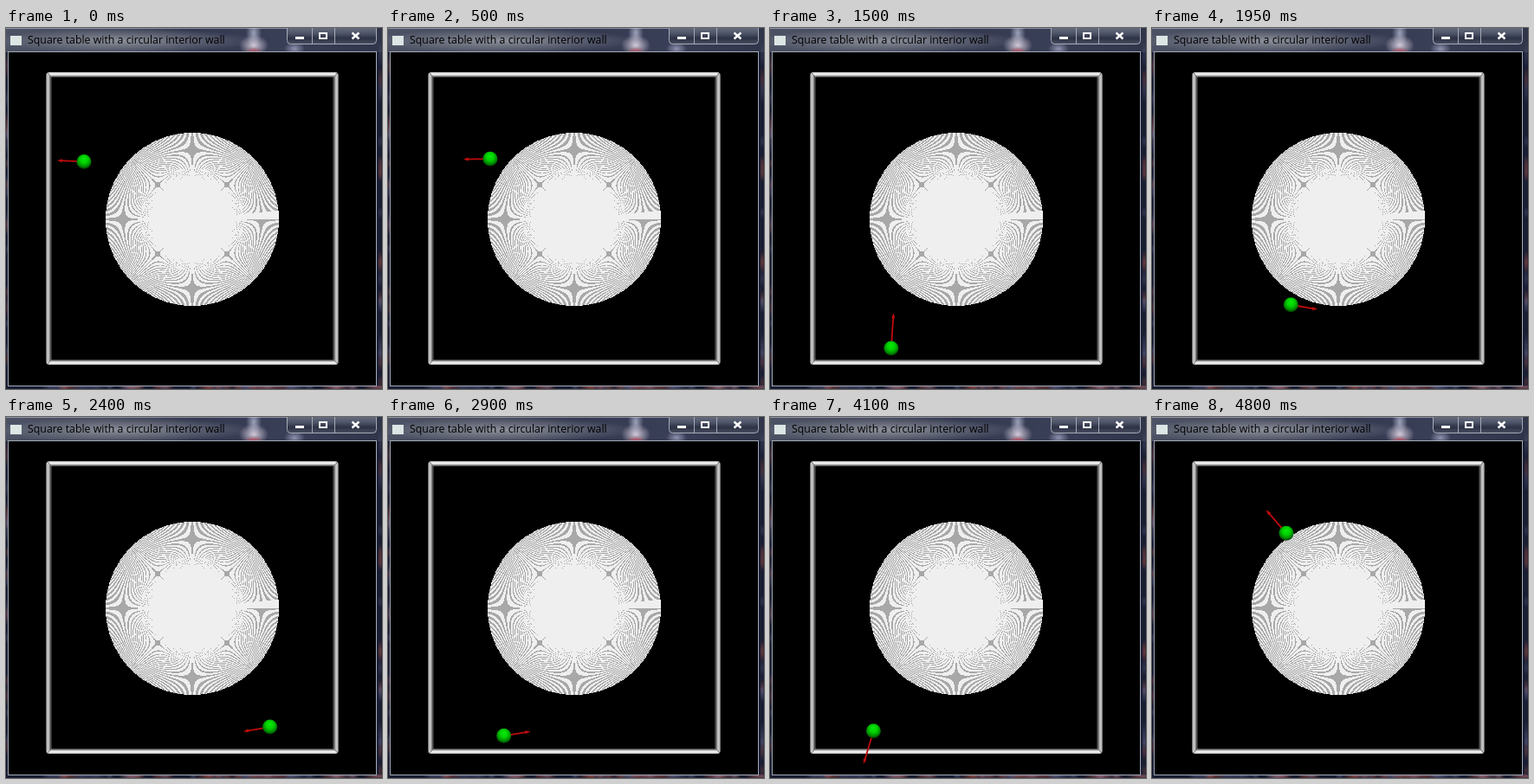
Recreate the animation shown at these times as an HTML page with a canvas. Size 434 by 417 pixels, loop 4850 ms.

```html
<!DOCTYPE html>
<html lang="en">
<head>
<meta charset="utf-8">
<title>Circular wall table</title>
<style>
  html, body { margin: 0; width: 100%; height: 100%; overflow: hidden; background: #000; }
  canvas { display: block; }
</style>
</head>
<body>
<canvas id="stage" width="434" height="417"></canvas>
<script>
const W = 434, H = 417, STEP = 50, STEPS = 97;
const CX = 215, CY = 220, R = 100;
const LEFT = 53, RIGHT = 382, TOP = 56, BOTTOM = 384.5;
const SPEED = 33.5;
const ctx = document.getElementById('stage').getContext('2d');

// Each launch: step, position, heading in degrees. Wall bounces follow by folding.
const launches = [
  [0, 90, 154.4, 182],
  [3.7, 143.3, 150.7, 270],
  [9.25, 143, 150.9, 179.3],
  [14.33, 141, 152.7, 266.7],
  [20.6, 129, 169, 145.6],
  [26.15, 128.4, 270.5, 84.9],
  [32.3, 147.5, 293.5, 172.4],
  [35.77, 53, 306, 7.3],
  [70.2, 233.6, 318.3, 150.2],
  [79.77, 146.9, 293.2, 111.6],
  [95.88, 158, 137, 221.3]
];

// Reflects a straight coordinate between two walls.
function fold(v, lo, hi) {
  const span = hi - lo;
  const u = (((v - lo) % (2 * span)) + 2 * span) % (2 * span);
  return u < span ? { pos: lo + u, sign: 1 } : { pos: hi - (u - span), sign: -1 };
}

function ballAt(step) {
  const [t0, x0, y0, deg] = launches.findLast(l => l[0] <= step);
  const a = deg * Math.PI / 180, s = SPEED * (step - t0);
  const fx = fold(x0 + s * Math.cos(a), LEFT, RIGHT);
  const fy = fold(y0 + s * Math.sin(a), TOP, BOTTOM);
  return { x: fx.pos, y: fy.pos, ux: Math.cos(a) * fx.sign, uy: Math.sin(a) * fy.sign };
}

let seed = 7;
function random() {
  seed = (seed * 16807) % 2147483647;
  return seed / 2147483647;
}

function gradient(g, x0, y0, x1, y1, colors) {
  const grad = g.createLinearGradient(x0, y0, x1, y1);
  colors.forEach((color, i) => grad.addColorStop(i / (colors.length - 1), color));
  return grad;
}

function glow(g, x, y, rx, ry, rgb, alpha) {
  g.save();
  g.translate(x, y);
  g.scale(rx, ry);
  const grad = g.createRadialGradient(0, 0, 0, 0, 0, 1);
  grad.addColorStop(0, `rgba(${rgb},${alpha})`);
  grad.addColorStop(1, `rgba(${rgb},0)`);
  g.fillStyle = grad;
  g.fillRect(-1, -1, 2, 2);
  g.restore();
}

function drawButtons(g) {
  g.beginPath();
  g.roundRect(324.5, -4.5, 103, 23, 4);
  g.fillStyle = gradient(g, 0, 0, 0, 18, ['#666c7c', '#50566a', '#2c3144', '#474c60']);
  g.fill();
  g.strokeStyle = '#a5a9b5';
  g.stroke();
  g.fillStyle = '#a5a9b5';
  g.fillRect(353, 0, 1, 18);
  g.fillRect(379, 0, 1, 18);
  g.fillStyle = '#fff';
  g.fillRect(334, 10, 10, 3);
  g.strokeStyle = '#fff';
  g.lineWidth = 2;
  g.strokeRect(362, 6, 8, 6);
  g.lineWidth = 2.4;
  g.beginPath();
  g.moveTo(399.5, 5.5); g.lineTo(407.5, 12.5);
  g.moveTo(407.5, 5.5); g.lineTo(399.5, 12.5);
  g.stroke();
  g.lineWidth = 1;
}

function drawBackdrop(g) {
  g.fillStyle = '#191d32';
  g.fillRect(0, 0, W, H);
  g.fillStyle = gradient(g, 0, 0, W, 0, ['#4c5264', '#464b5d', '#343950', '#3a3f58', '#30354a']);
  g.fillRect(0, 0, W, 28);
  glow(g, 135, 15, 155, 14, '165,168,175', 0.75);
  glow(g, 286, 6, 9, 16, '200,205,230', 0.7);
  glow(g, 286, 20, 17, 12, '225,215,230', 0.9);
  glow(g, 286, 27, 11, 5, '200,60,75', 0.7);
  glow(g, 333, 24, 12, 8, '180,180,210', 0.7);
  for (let i = 0; i < 40; i++) {
    const warm = random() < 0.5 ? '190,90,70' : '110,110,150';
    glow(g, random() * W, 415, 5 + random() * 12, 3, warm, 0.5);
    glow(g, i % 2 ? 432 : 1, 30 + random() * 380, 3, 5 + random() * 12, warm, 0.3);
  }
}

function drawWindow(g) {
  drawBackdrop(g);
  g.fillStyle = 'rgba(230,235,245,.45)';
  g.fillRect(0, 0, 324, 1);
  g.fillStyle = '#000';
  g.fillRect(3, 28, 424, 385);
  g.strokeStyle = '#a3abb8';
  g.strokeRect(2.5, 27.5, 425, 386);
  g.fillStyle = '#dce6e4';
  g.fillRect(5, 9, 13, 11);
  g.fillStyle = '#000';
  g.font = '12.35px "Open Sans", "Noto Sans", sans-serif';
  g.fillText('Square table with a circular interior wall', 25, 18);
  drawButtons(g);
}

function drawWalls(g) {
  ['#bcbcbc', '#e6e6e6', '#efefef', '#d2d2d2', '#8c8c8c', '#505050'].forEach((color, i) => {
    g.strokeStyle = color;
    g.lineWidth = 1.2;
    g.beginPath();
    g.roundRect(47 + i, 51.5 + i, 336 - 2 * i, 337 - 2 * i, Math.max(0, 3 - i));
    g.stroke();
  });
  g.strokeStyle = '#777';
  g.lineWidth = 1;
  g.beginPath();
  for (const sx of [1, -1]) for (const sy of [1, -1]) {
    const x = 215.5 - sx * 167.5, y = 220 - sy * 168;
    g.moveTo(x, y);
    g.lineTo(x + 5 * sx, y + 5 * sy);
  }
  g.stroke();
}

// Thin spokes sampled once per pixel, so they alias into a moire.
function drawDisc(g) {
  const spokes = 500, width = 0.59, seam = 0.1;
  for (let y = -R; y < R; y++) {
    for (let x = -R; x < R; x++) {
      const px = x + 0.5, py = y + 0.5, r = Math.hypot(px, py);
      if (r > R) continue;
      const a = Math.atan2(-py, px);
      const phase = a / (2 * Math.PI) * spokes;
      const off = Math.abs(phase - Math.round(phase)) * 2 * Math.PI * r / spokes;
      const lit = off < width / 2 || (a > 0 && a < seam);
      g.fillStyle = lit ? '#efefef' : '#a8a8a8';
      g.fillRect(CX + x, CY + y + 1, 1, 1);
    }
  }
}

function drawArrow(g, { x, y, ux, uy }) {
  const dx = 31 * ux, dy = 41 * uy, len = Math.hypot(dx, dy);
  g.save();
  g.translate(x, y);
  g.rotate(Math.atan2(dy, dx));
  g.fillStyle = '#c00c0c';
  g.fillRect(0, -0.9, len - 4, 1.8);
  g.beginPath();
  g.moveTo(len, 0); g.lineTo(len - 6, -2); g.lineTo(len - 6, 2);
  g.fill();
  g.restore();
}

function drawBall(g, { x, y }) {
  const grad = g.createRadialGradient(x, y - 3.5, 0, x, y - 1.5, 10);
  grad.addColorStop(0, '#08ec08');
  grad.addColorStop(0.45, '#00d000');
  grad.addColorStop(0.8, '#008400');
  grad.addColorStop(1, '#003000');
  g.fillStyle = grad;
  g.beginPath();
  g.arc(x, y, 8.5, 0, 7);
  g.fill();
}

const scene = document.createElement('canvas');
scene.width = W;
scene.height = H;
const sg = scene.getContext('2d');
drawWindow(sg);
drawWalls(sg);
drawDisc(sg);

const start = performance.now();
function render(now) {
  const step = Math.floor(Math.max(0, now - start) / STEP) % STEPS;
  const ball = ballAt(step);
  ctx.drawImage(scene, 0, 0);
  drawArrow(ctx, ball);
  drawBall(ctx, ball);
  requestAnimationFrame(render);
}
render(start);
</script>
</body>
</html>
```
